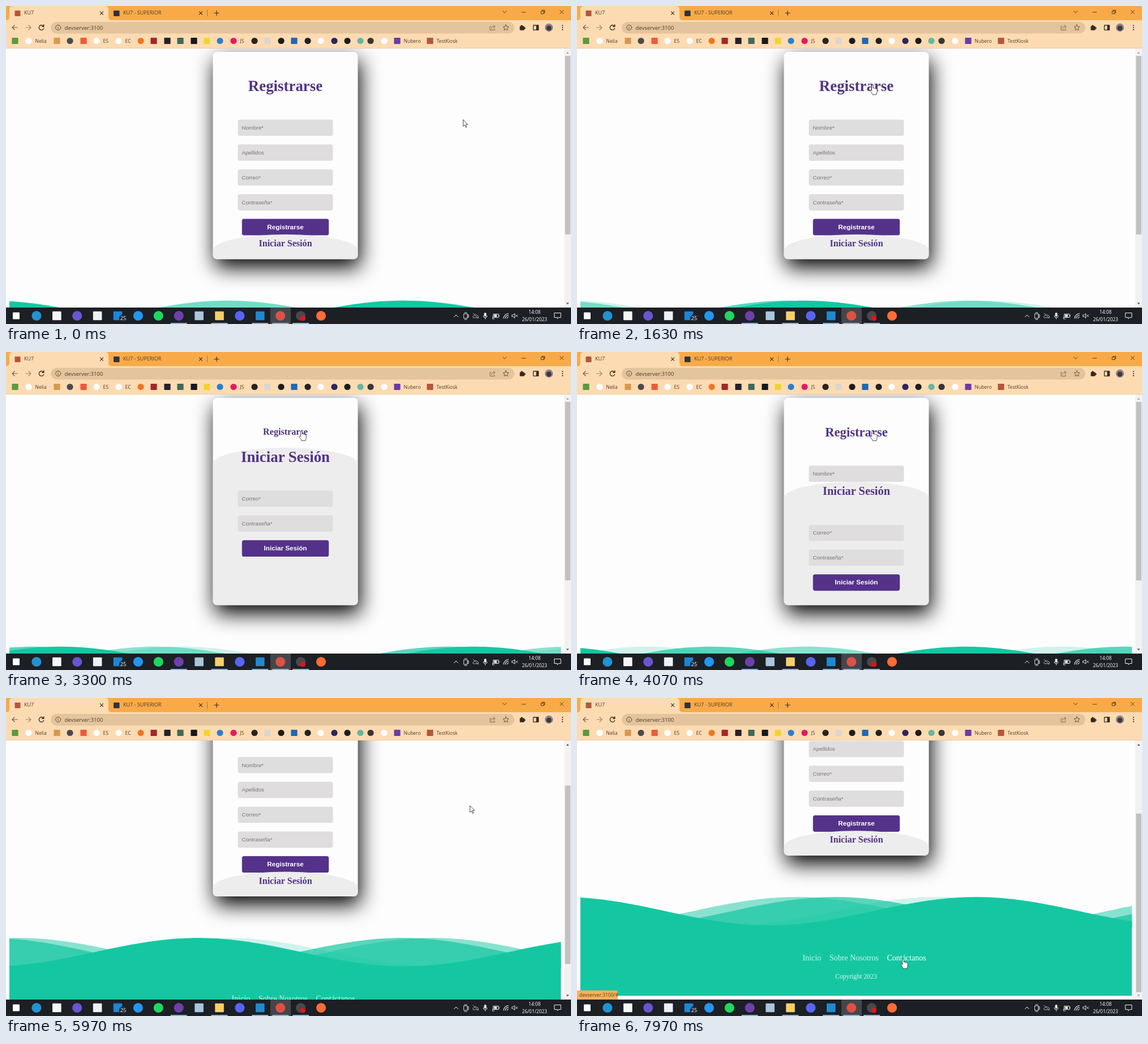
These frames come from a looping animation (998 px wide and 561 px high, 8000 ms). An HTML page:

```html
<!DOCTYPE html>
<html lang="es">
<head>
<meta charset="utf-8">
<title>Registro</title>
<style>
html, body { margin: 0; width: 100%; height: 100%; overflow: hidden; background: #fdfdfd; }
svg { display: block; width: 100%; height: 100%; }
.ui { font-family: "Open Sans", "Noto Sans", sans-serif; fill: #4a3d2c; }
.serif { font-family: "Liberation Serif", "Times New Roman", serif; }
.sans { font-family: "Liberation Sans", Arial, sans-serif; }
.label { font-weight: bold; font-size: 26.9px; fill: #533385; text-anchor: middle; }
.hint { font-size: 9.75px; fill: #77757a; }
.btn { font-weight: bold; font-size: 11.7px; fill: #fff; text-anchor: middle; }
.line { fill: none; stroke-linecap: round; stroke-linejoin: round; }
</style>
</head>
<body>
<svg viewBox="0 0 998 561" xmlns="http://www.w3.org/2000/svg">
  <defs>
    <clipPath id="view"><rect y="75" width="998" height="457"/></clipPath>
    <clipPath id="cardClip"><rect x="365.5" y="81" width="256" height="365.6" rx="7.3"/></clipPath>
    <clipPath id="footClip"><rect x="6" y="500" width="974.3" height="194.3"/></clipPath>
    <filter id="blur" x="-40%" y="-40%" width="180%" height="180%"><feGaussianBlur stdDeviation="18.3"/></filter>
  </defs>
  <rect width="998" height="561" fill="#fdfdfd"/>
  <g clip-path="url(#view)">
    <g id="page">
      <rect x="369.2" y="95.6" width="256" height="365.6" rx="7.3" filter="url(#blur)"/>
      <g clip-path="url(#cardClip)">
        <rect x="365" y="81" width="257" height="366" fill="#fdfdfe"/>
        <g id="signup"></g>
        <g id="login"></g>
      </g>
      <g id="footer" clip-path="url(#footClip)"></g>
    </g>
    <g id="scrollbar"></g>
    <g id="status">
      <path d="M0 516h69a3 3 0 0 1 3 3v13H0z" fill="#fbb257"/>
      <text class="ui" x="4" y="527.2" font-size="8.5">devserver:3100/#</text>
    </g>
  </g>
  <g id="browser"></g>
  <g id="taskbar"></g>
  <g id="cursor">
    <path id="arrow" d="M0 0V11.8L2.8 9.3 4.7 13.7 6.5 12.9 4.6 8.6H8.2Z" fill="#fff" stroke="#222" stroke-width=".8" stroke-linejoin="round"/>
    <path id="hand" d="M-1.4 1.3C-1.4-.4 1.2-.4 1.2 1.3V6C1.6 5 3.6 5.2 3.7 6.6 4.4 5.7 6 6 6.1 7.3 7 6.6 8.2 7.2 8.2 8.4V12C8.2 14 7.2 15 6.9 17.4H.2C-.4 15.2-2.6 13.2-4 10.6-4.7 9.3-3.2 8.3-2.2 9.4L-1.4 10.4Z" fill="#fff" stroke="#222" stroke-width=".8" stroke-linejoin="round"/>
  </g>
</svg>
<script>
const $ = id => document.getElementById(id);
const rect = (x, y, w, h, fill, r = 0) => `<rect x="${x}" y="${y}" width="${w}" height="${h}" rx="${r}" fill="${fill}"/>`;
const circle = (x, y, r, fill) => `<circle cx="${x}" cy="${y}" r="${r}" fill="${fill}"/>`;
const line = (d, color, w = 1) => `<path class="line" d="${d}" stroke="${color}" stroke-width="${w}"/>`;
const text = (x, y, s, cls, attrs = '') => `<text class="${cls}" x="${x}" y="${y}" ${attrs}>${s}</text>`;
const ui = (x, y, s, size) => text(x, y, s, 'ui', `font-size="${size}"`);

const MID = 493.5, TEAL = '#14c7a2', PERIOD = 731, MAX_SCROLL = 168.7;
const field = (y, s) => rect(409.5, y, 168, 28.6, '#dfddde', 3.6) + text(416.4, y + 17.6, s, 'sans hint');
const button = (y, s) => rect(416.8, y, 153.4, 29, '#55328a', 3.6) + text(MID, y + 18.2, s, 'sans btn');
const label = (id, s) => `<g id="${id}"><text class="serif label" y="9.1">${s}</text></g>`;

$('signup').innerHTML = label('upLabel', 'Registrarse') +
  ['Nombre*', 'Apellidos', 'Correo*', 'Contraseña*'].map((s, i) => field(200.5 + 43.85 * i, s)).join('') +
  button(375.6, 'Registrarse');

// Login panel, drawn with its top edge at y = 0
$('login').innerHTML =
  '<path d="M365.5 28A128 28 0 0 1 621.5 28V308A128 28 0 0 1 365.5 308Z" fill="#ededee"/>' +
  label('inLabel', 'Iniciar Sesión') + field(75.5, 'Correo*') + field(119.3, 'Contraseña*') + button(163, 'Iniciar Sesión');

let crest = 'M-740 572';
for (let x = -740; x <= 992; x += 6)
  crest += `L${x} ${(544.8 - 25 * Math.cos(2 * Math.PI * x / PERIOD)).toFixed(2)}`;
crest += 'V572Z';
const waves = [ // opacity, loop in ms, direction
  [.2, 3000, -1], [.7, 3000, 1], [.5, 4000, 1], [1, 4000, -1]
];
const link = (x, s, id = '') => text(x, 631.8, s, 'serif', `id="${id}" font-size="14.03" fill="#fff" opacity=".78"`);
$('footer').innerHTML =
  waves.map((w, i) => `<path id="wave${i}" d="${crest}" fill="${TEAL}" opacity="${w[0]}"/>`).join('') +
  rect(6, 569.5, 974.3, 125, TEAL) +
  link(398.6, 'Inicio') + link(446, 'Sobre Nosotros') + link(547.4, 'Contáctanos', 'contact') +
  text(MID - .5, 664.2, 'Copyright 2023', 'serif', 'font-size="11.7" fill="#fff" opacity=".85" text-anchor="middle"');

$('scrollbar').innerHTML = rect(986, 75, 12, 457, '#f2f2f2') +
  '<path id="up" d="M989.5 84l2.5-3 2.5 3z"/><path id="down" d="M989.5 523.5l2.5 3 2.5-3z"/>' +
  '<rect id="thumb" x="987.5" y="88" width="9.5" height="315" fill="#c1c1c1"/>';

// Bookmarks: x, colour, shape (c = circle, s = square), caption
const marks = [
  [16, '#5b9a3c', 's'], [40, '#fff', 'c', 'Nelia'], [90, '#d9984e', 's'], [113, '#4b4a4c', 'c'],
  [137, '#ef5a3c', 's'], [160, '#fff', 'c', 'ES'], [199, '#fff', 'c', 'EC'], [238, '#ee7623', 'c'],
  [261, '#a3262c', 's'], [285, '#25202c', 's'], [308, '#3d6b58', 's'], [332, '#17181f', 's'],
  [355, '#f0d530', 's'], [378, '#2a7fd0', 'c'], [402, '#e5195f', 'c', 'JS'], [439, '#27231f', 'c'],
  [462, '#dcd5d0', 's'], [486, '#1d1b1b', 'c'], [509, '#1f68b8', 's'], [533, '#222020', 'c'],
  [556, '#fff', 'c'], [580, '#2c2560', 'c'], [603, '#1d1b1b', 'c'], [626, '#66b7a0', 'c'],
  [644, '#3a3634', 'c'], [668, '#fff', 'c'], [691, '#6a3ba8', 's', 'Nubero'], [749, '#b5563a', 's', 'TestKiosk']
];
const badge = (x, y, r, color, shape) => shape === 'c' ? circle(x, y, r, color) : rect(x - r, y - r, 2 * r, 2 * r, color, 1);
const INK = '#3b2f20';
const cross = (x, y, r, color = INK, w = 1.1) => line(`M${x - r} ${y - r}l${2 * r} ${2 * r}m0 ${-2 * r}l${-2 * r} ${2 * r}`, color, w);

$('browser').innerHTML =
  rect(0, 0, 998, 26, '#f9aa48') + rect(0, 25, 998, 50, '#fddbb2') + rect(0, 74, 998, 1, '#eccba4') +
  '<path d="M0 25.5Q6 25 6 19V6Q6 0 12 0H175Q181 0 181 6V19Q181 25 187 25.5Z" fill="#fddbb2"/>' +
  rect(15.5, 8, 10, 10, '#b5563a', 1) + ui(32, 15.4, 'KU7', 9) + cross(169, 12.5, 2.6) +
  rect(190, 8, 10.5, 10, '#2d3440', 1) + ui(207, 15.4, 'KU7 - SUPERIOR', 9) + cross(344, 12.5, 2.6) +
  line('M355.5 7V18', '#a8783c') + line('M368 12.5h8m-4-4v8', INK, 1.2) +
  line('M877.5 9l3.2 3 3.2-3M911 11h7M945.5 9h4.5v4.5h-4.5zM947 8.8V7.5h4.6V12H950', INK, .9) + cross(981.5, 10.5, 3, INK, .9) +
  line('M20 38H11m4-4-4 4 4 4', '#6b5a45', 1.2) + line('M35 38h9m-4-4 4 4-4 4', '#9f8a6c', 1.2) +
  line('M66.3 35.8a4.3 4.3 0 1 0 .4 3.6M66.8 33v3.2h-3.2', INK, 1.4) +
  rect(79, 28, 819, 20.6, '#e3c49d', 10.3) +
  line('M96.7 38a4.5 4.5 0 1 0-9 0a4.5 4.5 0 1 0 9 0M92.2 37.6v2.6M92.2 35.6v.1', '#5b4a34') +
  ui(103.5, 41.5, 'devserver:3100', 9.5) +
  line('M857 36h-2v6.5h8V40M857.5 40q.5-4 5-4M861 33.5l3 2.6-3 2.6', '#75634b', .9) +
  line('M883 33l1.5 3.3 3.5.4-2.6 2.4.7 3.5-3.1-1.8-3.1 1.8.7-3.5-2.6-2.4 3.5-.4z', '#5b4a34', .9) +
  rect(907.5, 35.5, 8, 7.3, '#332a20', 1) + circle(911, 35.2, 1.8, '#332a20') + circle(916, 39, 1.7, '#332a20') +
  line('M931.5 34h9v8.3h-9z', '#332a20', 1.3) + rect(936.5, 34, 4, 8.3, '#332a20') +
  circle(959, 38, 7.2, '#8d858b') + circle(959, 39, 4.5, '#3f383e') +
  [34.3, 38, 41.7].map(y => circle(983, y, 1.1, '#332a20')).join('') +
  marks.map(([x, color, shape, name]) => badge(x, 61.5, 5.6, color, shape) +
    (name ? ui(x + 11.5, 64.6, name, 8.5) : '')).join('');

// Taskbar: colour, shape, running
const apps = [
  ['#fff', 's'], ['#2293cf', 'c'], ['#f6f6f6', 's'], ['#6a55cf', 'c'], ['#eef1f4', 's'], ['#1b87d6', 's'],
  ['#2496ed', 'c'], ['#1ed760', 'c'], ['#6e40a9', 'c', 1], ['#a9c6dc', 's'], ['#f7cf68', 's', 1], ['#5865f2', 'c'],
  ['#2189d0', 's', 1], ['#de5145', 'c', 1], ['#4a484c', 'c', 1], ['#ff6c37', 'c']
];
const W = '#f0f0f0';
$('taskbar').innerHTML = rect(0, 532, 998, 29, '#1c1f24') + rect(467, 532, 36, 29, '#43474b') +
  apps.map(([color, shape, on], i) => {
    const x = 18 + 35.9 * i;
    return badge(x, 546.5, shape === 'c' ? 8.6 : i ? 7.8 : 6, color, shape) +
      (on ? rect(x - 14.5, 559, 29, 2, '#78b8e8') : '');
  }).join('') +
  circle(207, 551, 7.2, '#20272e') + text(207, 554.3, '25', 'ui', 'font-size="9" style="fill:#fff" text-anchor="middle"') +
  circle(524.5, 551, 4.6, '#e8121c') +
  line('M791.5 548.5l3.5-3.5 3.5 3.5', W) +
  line('M809 543h6v8h-6zM815 545.5l2-1v5l-2-1M810 541h4M810 553h4', W, .9) +
  line('M825 549.5q-1-3 2-3.5 2-3 5-.5 3 .5 2.5 4zM825 542l9 9', '#b9bcc0', .9) +
  rect(844.5, 541, 4, 7, W, 2) + line('M843 546.5q0 3.5 3.5 3.5t3.5-3.5M846.5 550v2.3', W, .9) +
  line('M861 543.5h9v6h-9zM871 545.5v2', W) + rect(862, 544.5, 5, 4, W) + line('M859.5 549v3h3', W, .9) +
  line('M879 551a9 9 0 0 1 8.5-8.5M882 551a6 6 0 0 1 5.5-5.5M885 551a3 3 0 0 1 2.5-2.5', W, 1.1) +
  line('M894 545h2l2.5-2.5v8l-2.5-2.5h-2z', W, .9) + cross(902, 546.5, 1.7, W, .9) +
  ['14:08', '26/01/2023'].map((s, i) => text(933.7, 542.8 + 12.8 * i, s, 'ui', 'font-size="8.4" style="fill:#fff" text-anchor="middle"')).join('') +
  line('M969 541.5h11v8h-4l-2 2.3v-2.3h-5z', W);

// cubic-bezier(.42, 0, .58, 1)
function ease(p) {
  if (p <= 0) return 0;
  if (p >= 1) return 1;
  let lo = 0, hi = 1, u = .5;
  for (let i = 0; i < 22; i++) {
    u = (lo + hi) / 2;
    const x = 1.26 * u * (1 - u) * (1 - u) + 1.74 * u * u * (1 - u) + u * u * u;
    if (x < p) lo = u; else hi = u;
  }
  return u * u * (3 - 2 * u);
}

const OPEN = 1660, CLOSE = 3790;
const opened = (t, ms) => t < CLOSE ? ease((t - OPEN) / ms) : 1 - ease((t - CLOSE) / ms);

// Pointer stops: time, x, y
const stops = [
  [0, 807.5, 200.5], [350, 807.5, 200.5], [1300, 522, 139], [4400, 522, 139], [5150, 841, 141.3],
  [5500, 841, 141.3], [6300, 808, 216], [6900, 808, 216], [7650, 576, 460], [8000, 576, 460]
];
function pointer(t) {
  const i = stops.findIndex(s => s[0] > t), a = stops[i - 1], b = stops[i];
  const k = ease((t - a[0]) / (b[0] - a[0]));
  return [a[1] + (b[1] - a[1]) * k, a[2] + (b[2] - a[2]) * k];
}

const move = (id, x, y, s = 1) => $(id).setAttribute('transform', `translate(${x.toFixed(2)} ${y.toFixed(2)}) scale(${s.toFixed(4)})`);
const show = (id, on) => $(id).setAttribute('display', on ? 'inline' : 'none');

function draw(t) {
  const panel = opened(t, 800), turn = opened(t, 500);
  move('login', 0, 403 - 234 * panel);
  move('upLabel', MID, 141, 1 - .4 * turn);
  move('inLabel', MID, 15.7, .6 + .4 * turn);

  const down = ease((t - 5700) / 500), scroll = MAX_SCROLL * down;
  move('page', 0, -scroll);
  move('thumb', 0, 116 * down);
  $('up').setAttribute('fill', down > 0 ? '#505050' : '#a3a3a3');
  $('down').setAttribute('fill', down < 1 ? '#505050' : '#a3a3a3');

  waves.forEach(([, ms, dir], i) => {
    const x = 180.5 + dir * PERIOD * (t + 5160) / ms;
    move('wave' + i, ((x % PERIOD) + PERIOD) % PERIOD, 0);
  });

  const [x, y] = pointer(t);
  const size = 1 - .4 * turn;
  const onLabel = Math.abs(x - MID) < 84 * size && Math.abs(y + scroll - 141) < 15 * size;
  const onLink = x > 547 && x < 617 && Math.abs(y + scroll - 628) < 8;
  move('cursor', x, y);
  show('hand', onLabel || onLink);
  show('arrow', !onLabel && !onLink);
  show('status', onLink);
  $('contact').setAttribute('opacity', onLink ? 1 : .78);
}

const start = performance.now();
function tick() {
  draw((performance.now() - start) % 8000);
  requestAnimationFrame(tick);
}
tick();
</script>
</body>
</html>
```
